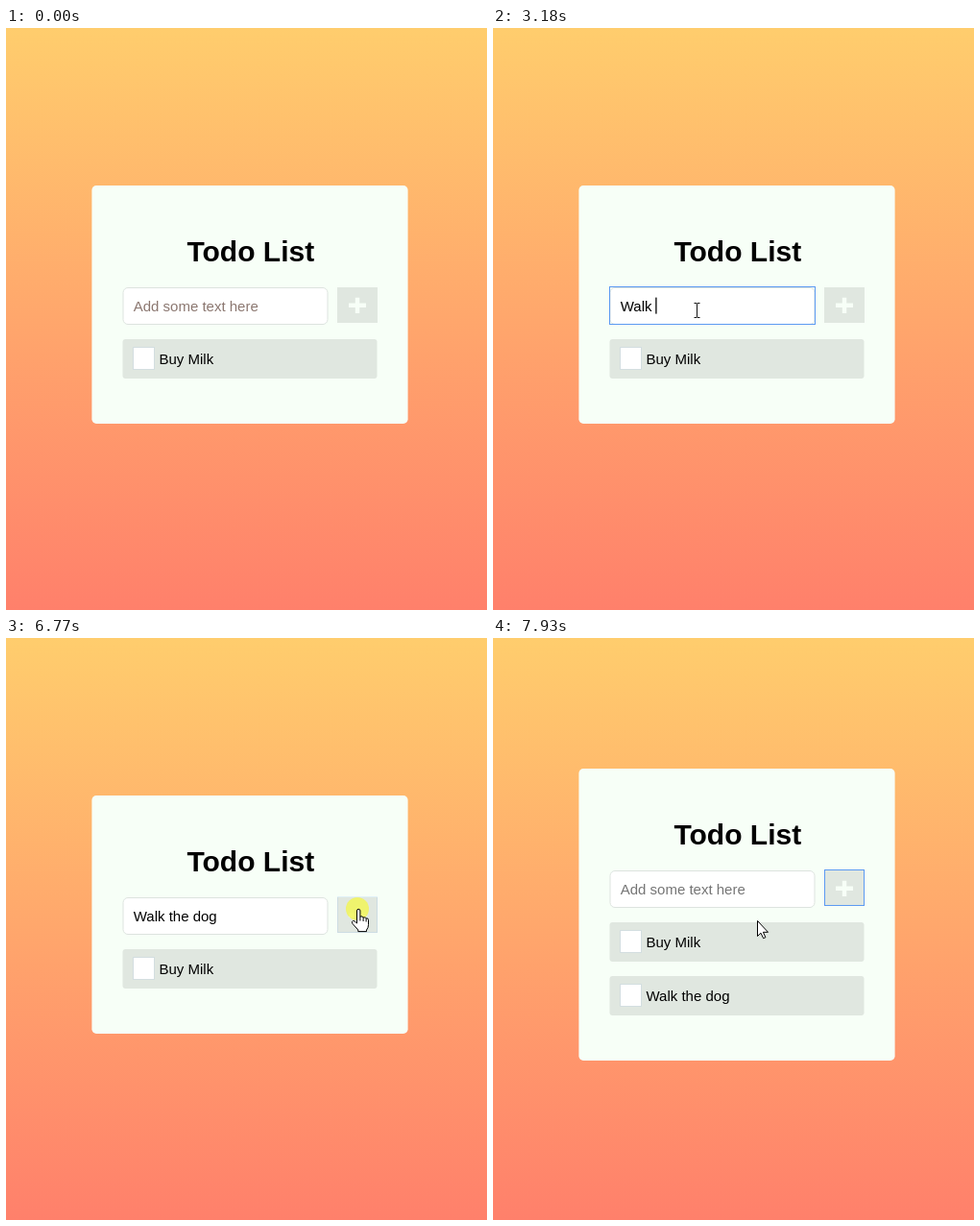
Recreate the animation shown at these times as an HTML page. Size 501 by 606 pixels, loop 8 s.

```html
<!DOCTYPE html>
<html lang="en">
<head>
<meta charset="utf-8">
<title>Todo List</title>
<style>
html, body { margin: 0; width: 100%; height: 100%; overflow: hidden; }
svg { display: block; width: 501px; height: 606px; }
text { font: 15px "Liberation Sans", Arial, sans-serif; white-space: pre; }
.title { font-size: 30px; font-weight: bold; }
.panel { fill: #e0e7e0; }
.check { fill: #fff; stroke: #d3dee0; }
.ring { fill: none; stroke: #5c9af2; }
.cursor { fill: #fff; stroke: #000; stroke-linejoin: round; }
</style>
</head>
<body>
<svg viewBox="0 0 501 606">
  <defs>
    <linearGradient id="sky" x1="0" y1="0" x2="0" y2="1">
      <stop offset="0" stop-color="#ffcd6d"/>
      <stop offset="1" stop-color="#ff806b"/>
    </linearGradient>
    <clipPath id="inside"><rect x="89.4" y="136" width="329.2" height="304"/></clipPath>
    <g id="row">
      <rect class="panel" x="121.5" y="324" width="265" height="41" rx="3"/>
      <rect class="check" x="132.5" y="332.5" width="22" height="23"/>
    </g>
  </defs>
  <rect width="501" height="606" fill="url(#sky)"/>
  <rect id="card" x="89.4" width="329.2" rx="4.7" fill="#f7fff7"/>
  <g clip-path="url(#inside)">
    <g id="content">
      <text class="title" x="254.8" y="243" text-anchor="middle">Todo List</text>
      <rect x="122" y="270.5" width="213" height="38" rx="5" fill="#fff" stroke="#dde3df"/>
      <rect id="fieldRing" class="ring" x="121.5" y="269.5" width="214" height="39"/>
      <text id="field" x="132.7" y="295"></text>
      <rect id="caret" y="280.6" width="1.3" height="17"/>
      <rect class="panel" x="345" y="270" width="42" height="37"/>
      <path d="M359.2 288.8H372.8M366 282.9V294.9" stroke="#f7fff7" stroke-width="4.4" stroke-linecap="square" fill="none"/>
      <rect id="buttonRing" class="ring" x="345.5" y="269.5" width="41" height="37"/>
      <use href="#row"/>
      <text x="159.5" y="350">Buy Milk</text>
      <g id="added">
        <use href="#row"/>
        <text x="159.5" y="350">Walk the dog</text>
      </g>
    </g>
  </g>
  <g id="pointer">
    <circle id="click" r="12" fill="#f1f558" fill-opacity=".85"/>
    <path id="arrow" class="cursor" d="M.5 .5V16.5L4 13.2l2.6 5.5 2.3-1-2.5-5.4H11.5z"/>
    <g id="hand" class="cursor">
      <path d="M-.5 15V2a1.7 1.7 0 0 1 3.4 0V8q3-.6 3.2 1 2.6-.6 3 .8 2.4-.2 2.4 1.8v5q0 3-2 5.5v1.5H.8V22L-5 15.5q-1.5-2.5 .5-3 1.5-.2 4 2.5z"/>
      <path d="M2.9 8v4.5M6.1 9v4M9.1 10v3.5" fill="none"/>
    </g>
    <path id="beam" d="M-.5-6.5H2L2.5-6 3-6.5H5.5M2.5-6V8M-.5 8.5H2L2.5 8 3 8.5H5.5" fill="none" stroke="#111"/>
  </g>
</svg>
<script>
const LOOP = 8000;
const TEXT = 'Walk the dog', HINT = 'Add some text here';
const KEYS = [2180, 2490, 2720, 2800, 3180, 3410, 3560, 3730, 3870, 4500, 4730, 4880];
const CARET_OFF = [[1640, 2100], [4430, 4500], [5440, 5980], [6450, 6680]];
const FOCUS = 1120, PRESS = 6680, RELEASE = 6850, TICK = 79;
const SLIDE_START = 6844, SLIDE_TIME = 500;

// start, step length, steps, target x, target y, upward bow
const MOVES = [
  [418, 78, 9, 210, 293, 0],
  [5750, 77.5, 5, 364, 262, 0],
  [6210, 70, 2, 364, 268, 0],
  [6530, 70, 1, 366, 282, 0],
  [7700, 76.7, 4, 275, 294, 19]
];

const $ = id => document.getElementById(id);
const show = (id, on) => $(id).setAttribute('display', on ? 'inline' : 'none');
const shift = (id, x, y) => $(id).setAttribute('transform', `translate(${x} ${y})`);
const within = (t, a, b) => t >= a && t < b;
const smooth = p => p * p * (3 - 2 * p);
const easeIn = p => Math.pow(p, 1.6);
const clamp = p => Math.max(0, Math.min(1, p));

function pointerAt(t) {
  let x = 382, y = 316;
  for (const [start, step, count, toX, toY, bow] of MOVES) {
    if (t < start) break;
    const p = Math.min(count, Math.floor((t - start) / step) + 1) / count;
    const e = bow ? p : smooth(p);
    x += (toX - x) * e;
    y += (toY - y) * e - bow * Math.sin(Math.PI * p);
  }
  return [x, y];
}

function cursorKind(x, y, lift) {
  const over = (left, right, top, bottom) =>
    within(x, left, right) && within(y + lift, top, bottom);
  if (over(121, 336, 270, 309)) return 'beam';
  return over(345, 387, 270, 307) ? 'hand' : 'arrow';
}

function draw(t) {
  const grown = t >= RELEASE;
  const lift = grown ? 28 : 0;
  const focused = within(t, FOCUS, PRESS);

  $('card').setAttribute('y', 164 - lift);
  $('card').setAttribute('height', 248 + 2 * lift);
  shift('content', 0, -lift);

  const typed = grown ? '' : TEXT.slice(0, KEYS.filter(k => k <= t).length);
  const field = $('field');
  field.textContent = typed || HINT;
  field.setAttribute('fill', typed ? '#000' : grown ? '#757575' : '#8b7770');
  const width = typed ? field.getComputedTextLength() : 0;
  $('caret').setAttribute('x', 132.3 + width);
  show('caret', focused && !CARET_OFF.some(([a, b]) => within(t, a, b)));
  show('fieldRing', focused);
  show('buttonRing', t >= PRESS);
  $('buttonRing').setAttribute('opacity', grown ? 1 : .15);

  const tick = PRESS + Math.floor((t - PRESS) / TICK) * TICK;
  const p = clamp((tick - SLIDE_START) / SLIDE_TIME);
  show('added', grown);
  shift('added', 265 * (1 - easeIn(p)), 56);

  const [x, y] = pointerAt(t);
  const kind = cursorKind(x, y, lift);
  show('pointer', t >= 340);
  shift('pointer', Math.round(x), Math.round(y));
  for (const id of ['arrow', 'hand', 'beam']) show(id, id === kind);
  show('click', within(t, FOCUS, 1180) || within(t, PRESS, RELEASE));
}

const begin = performance.now();
function frame() {
  draw((performance.now() - begin) % LOOP);
  requestAnimationFrame(frame);
}
frame();
</script>
</body>
</html>
```
